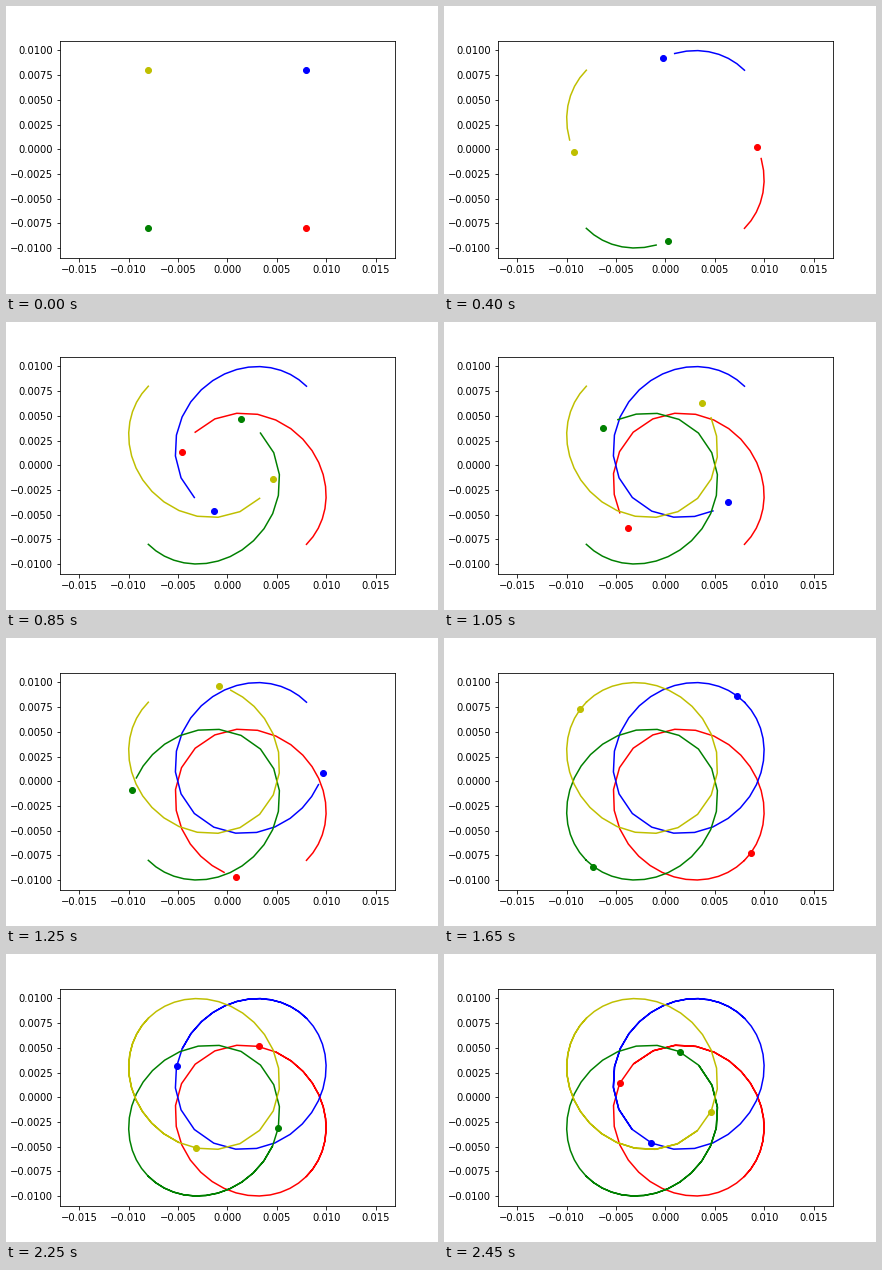
Recreate the animation shown at these times as a matplotlib script. Size 432 by 288 pixels, loop 2500 ms.

```python
import numpy as np
import matplotlib.pyplot as plt
from matplotlib.animation import FuncAnimation

FRAMES = 50
INTERVAL = 50
PERIOD = 32.05                # frames per orbit
ECC = 0.4156
FAR = 0.008 * np.sqrt(2)      # starting distance, the farthest point
COLORS = {"r": -45, "b": 45, "g": 225, "y": 135}   # start angles in degrees


def kepler_orbit(n):
    """Complex positions on an ellipse about the origin, starting farthest out."""
    mean = np.pi + 2 * np.pi * np.arange(n) / PERIOD
    ecc_anom = mean.copy()
    for _ in range(12):
        ecc_anom -= (ecc_anom - ECC * np.sin(ecc_anom) - mean) / (1 - ECC * np.cos(ecc_anom))
    a = FAR / (1 + ECC)
    b = a * np.sqrt(1 - ECC ** 2)
    return -(a * (np.cos(ecc_anom) - ECC) + 1j * b * np.sin(ecc_anom))


fig, ax = plt.subplots(figsize=(6, 4), dpi=72)
fig.subplots_adjust(left=0.125, right=0.9, bottom=0.125, top=0.88)
half_h = 0.011
half_w = half_h * (0.775 * 6) / (0.755 * 4)
ax.set_xticks(np.arange(-3, 4) * 0.005)
ax.set_yticks(np.arange(-4, 5) * 0.0025)
ax.set_xlim(-half_w, half_w)
ax.set_ylim(-half_h, half_h)

orbit = kepler_orbit(FRAMES)
bodies = []
for color, angle in COLORS.items():
    path = orbit * np.exp(1j * np.radians(angle))
    trail, = ax.plot([], [], color=color, lw=1.5)
    dot, = ax.plot([], [], "o", color=color, ms=6)
    bodies.append((path, trail, dot))


def update(i):
    artists = []
    for path, trail, dot in bodies:
        trail.set_data(path[:i].real, path[:i].imag)
        dot.set_data([path[i].real], [path[i].imag])
        artists += [trail, dot]
    return artists


anim = FuncAnimation(fig, update, frames=FRAMES, interval=INTERVAL,
                     repeat=True, repeat_delay=0)
plt.show()
```
